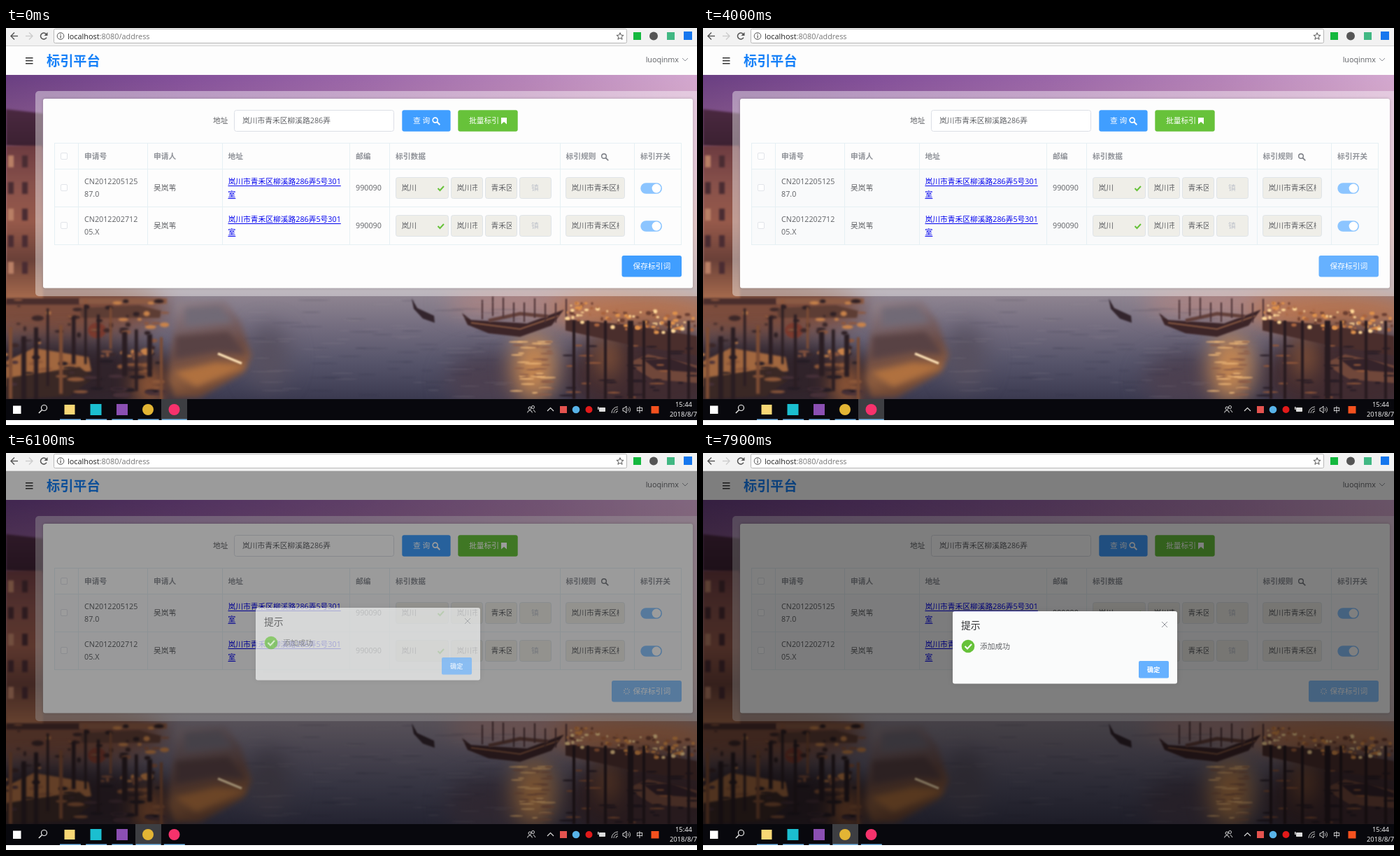
An HTML page with a canvas for the animation above (8 s loop, 988 by 567 pixels).

```html
<!DOCTYPE html>
<html lang="zh">
<head>
<meta charset="utf-8">
<style>
html, body { margin: 0; width: 100%; height: 100%; overflow: hidden; background: #fff; }
canvas { display: block; }
</style>
</head>
<body>
<canvas id="stage" width="988" height="567"></canvas>
<script>
const stage = document.getElementById('stage');
const FONT = '"Open Sans", "Noto Sans CJK SC", "Noto Sans CJK", sans-serif';
const INK = '#606266', MUTED = '#909399', BLUE = '#409eff', LIGHT_BLUE = '#66b1ff', PALE_BLUE = '#8cc5ff';
const GREEN = '#67c23a', BORDER = '#e6f0f4';
const CITY = '岚川', DISTRICT = '青禾区', STREET = CITY + '市' + DISTRICT + '柳溪路286弄';
let c = stage.getContext('2d');

function rect(x, y, w, h, fill, r = 0, stroke) {
  c.beginPath();
  c.roundRect(x, y, w, h, r);
  if (fill) { c.fillStyle = fill; c.fill(); }
  if (stroke) { c.strokeStyle = stroke; c.lineWidth = 1; c.stroke(); }
}
function path(points, color, width) {
  c.beginPath();
  for (let i = 0; i < points.length; i += 2) c.lineTo(points[i], points[i + 1]);
  if (width) { c.strokeStyle = color; c.lineWidth = width; c.stroke(); }
  else { c.fillStyle = color; c.fill(); }
}
function arc(x, y, r, color, width, from = 0, to = 7) {
  c.beginPath();
  c.arc(x, y, r, from, to);
  if (width) { c.strokeStyle = color; c.lineWidth = width; c.stroke(); }
  else { c.fillStyle = color; c.fill(); }
}
// y is the optical middle of the line
function text(s, x, y, color = INK, size = 10.75, weight = '', align = 'left') {
  c.font = `${weight} ${size}px ${FONT}`;
  c.textAlign = align;
  c.fillStyle = color;
  c.fillText(s, x, y + size * 0.37);
}
function lens(x, y, r, color, width, side = 1) {
  arc(x, y, r, color, width);
  path([x + side * r * .7, y + r * .7, x + side * r * 1.9, y + r * 1.9], color, width * 1.2);
}
function gradient(x0, y0, x1, y1, ...colors) {
  const g = c.createLinearGradient(x0, y0, x1, y1);
  colors.forEach((col, i) => g.addColorStop(i / (colors.length - 1), col));
  return g;
}
function glow(x, y, rx, ry, color) {
  c.beginPath();
  c.ellipse(x, y, rx, ry, 0, 0, 7);
  c.fillStyle = color;
  c.fill();
}

// Soft harbour at dusk, painted once
function paintPhoto() {
  const screen = c, layer = document.createElement('canvas');
  layer.width = 988; layer.height = 567;
  c = layer.getContext('2d');
  let seed = 7;
  const random = () => (seed = seed * 16807 % 2147483647) / 2147483647;

  // Sky and water
  rect(0, 60, 988, 330, gradient(0, 0, 988, 0, '#6a3f82', '#83509a', '#9a66a8', '#b583b8', '#d3a8cf'));
  rect(0, 60, 988, 330, gradient(0, 70, 0, 390, '#d09a9000', '#c898a060', '#c99a90d0', '#94848e'));
  rect(0, 371, 988, 170, gradient(0, 371, 0, 530, '#958a95', '#756e80', '#56546a', '#3b3a50'));
  c.filter = 'blur(16px)';
  glow(60, 400, 170, 45, '#7b4c3c');
  glow(70, 500, 190, 55, '#30232a');
  glow(760, 392, 130, 20, '#b08480');
  glow(900, 405, 120, 28, '#b8744f');
  glow(915, 495, 115, 65, '#402b30');
  glow(690, 505, 60, 40, '#4c4050');
  glow(755, 485, 30, 48, '#c88850');
  glow(860, 470, 12, 30, '#a0643c');
  glow(205, 510, 18, 30, '#b0683a');
  glow(375, 470, 30, 45, '#57505f');
  c.filter = 'blur(1.5px)';

  // Houses on the left edge
  path([0, 116, 53, 122, 53, 172, 0, 168], gradient(0, 116, 0, 172, '#4a2840', '#3a2030'));
  rect(0, 168, 53, 222, gradient(0, 168, 0, 385, '#6c3b40', '#87504a', '#96594a', '#6a4038', '#a4694c'));
  for (let i = 0; i < 10; i++) rect(3 + i % 2 * 20, 182 + (i >> 1) * 38, 8, 17, i % 4 ? '#4a2c32' : '#b98066');

  // Jetty with posts
  rect(0, 386, 105, 9, '#4a2e2c');
  rect(105, 386, 125, 8, '#8b5a44');
  path([105, 400, 190, 396, 222, 404, 220, 414, 108, 414], '#5d3d34');
  path([0, 476, 40, 457, 118, 470, 122, 490, 0, 512], '#a1673f');
  path([0, 500, 105, 484, 125, 500, 90, 526, 0, 530], '#3a2825');
  glow(130, 432, 13, 11, '#7a3a2e');
  for (let i = 0; i < 60; i++) glow(random() * 228, 388 + random() * 85, 2 + random() * 7, 1 + random() * 3, ['#c9834a', '#3b2728', '#8d573e', '#2e2024'][i % 4]);
  for (let i = 0; i < 40; i++) glow(random() * 228, 475 + random() * 55, 4 + random() * 9, 1 + random() * 2, ['#8c5739', '#241c24', '#463038'][i % 3]);
  for (let i = 0; i < 13; i++) rect(4 + i * 18, 392 + random() * 50, 3 + random() * 5, 60 + random() * 70, i % 4 ? '#2a1d22' : '#7c4c34');

  // Moving water taxi
  c.filter = 'blur(4px)';
  path([244, 390, 314, 390, 336, 420, 351, 468, 340, 492, 276, 528, 240, 528, 231, 500, 238, 440],
    gradient(270, 388, 300, 530, '#8f8088', '#78646a', '#6b4c46', '#8e5d3e', '#5c3b30'));
  path([256, 400, 306, 397, 324, 420, 256, 426], '#716a76');
  path([242, 440, 318, 434, 344, 466, 300, 462, 242, 472], '#584244');
  path([240, 492, 300, 478, 345, 482, 272, 512], '#b0713f');
  c.filter = 'blur(1.2px)';
  path([303, 465, 337, 479], '#ffe4b8', 3.5);

  // Gondolas
  path([580, 386, 588, 400, 612, 411, 613, 421, 596, 415, 583, 401], '#33252d');
  path([652, 407, 665, 417, 745, 422, 798, 402, 780, 425, 735, 441, 690, 436, 660, 424], '#3c2528');
  path([665, 421, 735, 430, 790, 411], '#a26a4a', 1.5);
  path([690, 418, 735, 408, 775, 412], '#63403a', 5);
  for (let i = 0; i < 9; i++) rect(680 + i * 15, 383 + random() * 12, 2, 28, '#4a3034');

  // Lit quay, posts and reflections
  path([800, 416, 890, 424, 988, 440, 988, 468, 890, 452, 800, 432], '#4a2e2c');
  path([890, 478, 918, 466, 988, 482, 988, 507, 925, 502, 905, 490], '#70473a');
  path([912, 474, 950, 472, 988, 486, 988, 492, 930, 488], '#35232a');
  for (let i = 0; i < 110; i++) {
    const x = 800 + random() * 188;
    glow(x, 388 + (x - 800) * .12 + random() * 32, 1 + random() * 3, 1 + random() * 2, ['#6b3f32', '#de914c', '#ffd898', '#a9643f'][i % 4]);
  }
  for (let i = 0; i < 40; i++) glow(753 + (random() - .5) * 50, 445 + random() * 82, 4 + random() * 9, 1, i % 2 ? '#eeb878' : '#8c5c48');
  for (let i = 0; i < 35; i++) glow(800 + random() * 185, 450 + random() * 78, 4 + random() * 9, 1.2, i % 3 ? '#281d26' : '#93583a');
  for (const x of [810, 830, 855, 889, 910, 946, 974]) rect(x, 418, x === 889 ? 8 : 4, 112, '#281b20');
  for (let i = 0; i < 90; i++) glow(355 + random() * 370, 388 + random() * 140, 8 + random() * 16, .8, i % 2 ? '#a094a030' : '#2a2b4030');
  c = screen;
  return layer;
}
const photo = paintPhoto();

function drawToolbar() {
  rect(0, 0, 988, 26, '#f2f2f2');
  rect(0, 25, 988, 1, '#d4d4d4');
  rect(68.5, 1.5, 819, 20, '#fff', 2, '#b8b8b8');
  for (const [x, d, color] of [[12, -1, '#555'], [33, 1, '#ccc']]) {
    path([x - 5, 11.5, x + 5, 11.5], color, 1.4);
    path([x, 6.5, x + 5 * d, 11.5, x, 16.5], color, 1.4);
  }
  arc(54, 11.5, 4.5, '#555', 1.5, .5, 5.6);
  path([59.5, 6, 59.5, 11, 54.5, 11], '#555');
  arc(78, 11.5, 4.8, '#555', 1);
  rect(77.5, 10.5, 1.2, 4, '#555');
  rect(77.5, 8.3, 1.2, 1.2, '#555');
  text('localhost', 88, 11.5, '#222', 10.9);
  text(':8080/address', 88 + c.measureText('localhost').width, 11.5, '#777', 10.9);
  const star = [];
  for (let i = 0; i <= 10; i++) {
    const r = i % 2 ? 2.3 : 5.3, a = i * Math.PI / 5;
    star.push(878 + r * Math.sin(a), 12 - r * Math.cos(a));
  }
  path(star, '#555', 1);
  rect(897, 6, 11, 11, '#14b83e');
  arc(926, 11.5, 6, '#555');
  rect(945, 6, 11, 11, '#41b883');
  rect(969, 5, 12, 12, '#1677ee');
}

function field(x, y, w, s, color = INK) {
  rect(x + .5, y + .5, w - 1, 30, '#efeee8', 3, '#dfe4e8');
  c.save();
  c.beginPath();
  c.rect(x + 8, y, w - 16, 31);
  c.clip();
  text(s, x + 8.5, y + 15.5, color);
  c.restore();
}

function drawRow(y, id, tail, tint) {
  c.globalAlpha = tint;
  rect(69, y, 897, 54, '#f5f7fa');
  c.globalAlpha = 1;
  rect(78.5, y + 22.5, 9, 9, '#fff', 1.5, '#e2e5ea');
  text(id, 112, y + 18.5);
  text(tail, 112, y + 36.5);
  text('吴岚苇', 211, y + 27.5);
  [[STREET + '5号301', y + 18.5], ['室', y + 36.5]].forEach(([s, ly]) => {
    text(s, 317.5, ly, '#0000ee');
    rect(317.5, ly + 5.5, c.measureText(s).width, 1, '#0000ee');
  });
  text('990090', 500, y + 27.5);
  field(557, y + 12, 76, CITY);
  path([617.5, y + 28, 620.5, y + 31, 626, y + 25], GREEN, 2);
  field(636, y + 12, 46, CITY + '市');
  field(685, y + 12, 46, DISTRICT);
  field(734, y + 12, 46, '');
  text('镇', 751, y + 27.5, '#c0c4cc');
  field(800, y + 12, 85, STREET);
  rect(907.3, y + 20.3, 30.7, 15.4, PALE_BLUE, 8);
  arc(930, y + 28, 6.4, '#fff');
}

function drawSpinner(x, y, angle) {
  for (let i = 0; i < 8; i++) {
    const a = angle + i * Math.PI / 4, u = Math.cos(a), v = Math.sin(a);
    path([x + 2.6 * u, y + 2.6 * v, x + 4.8 * u, y + 4.8 * v], '#fff', 1);
  }
}

function drawPage(t) {
  rect(0, 26, 988, 41, '#fdfdfd');
  for (const y of [42, 46, 50]) rect(28, y, 10.5, 1.5, '#333');
  text('标引平台', 58, 46.5, '#1680f8', 19.2, 'bold');
  text('luoqinmx', 962, 45, INK, 10.75, '', 'right');
  path([967, 43, 971, 47, 975, 43], MUTED, 1);
  c.drawImage(photo, 0, 67, 988, 463, 0, 67, 988, 463);
  rect(42, 90, 960, 293, 'rgba(255,255,255,.4)', 5);
  c.shadowColor = 'rgba(0,0,0,.2)';
  c.shadowBlur = 4;
  rect(53, 101, 929, 270.5, '#fdfdfd', 3);
  c.shadowColor = 'transparent';

  text('地址', 296, 132.5);
  rect(326.5, 117.5, 228, 30, '#fff', 3, '#dcdfe6');
  text(STREET, 338, 132.5);
  rect(566.3, 117.3, 69.3, 30.4, BLUE, 3);
  text('查 询', 582, 132.5, '#fff');
  lens(613.7, 131.6, 3.5, '#fff', 1.6);
  rect(646.3, 117.3, 85.4, 30.4, GREEN, 3);
  text('批量标引', 662, 132.5, '#fff');
  path([708, 128, 716, 128, 716, 137.5, 712, 134, 708, 137.5], '#fff');

  const rowOne = t < 600 ? 0 : t < 3600 ? Math.min(1, (t - 500) / 400) : .5;
  const rowTwo = t < 3600 ? 0 : t < 4000 ? 1 : .5;
  drawRow(201, 'CN2012205125', '87.0', rowOne);
  drawRow(255, 'CN2012202712', '05.X', rowTwo);
  rect(78.5, 178.5, 9, 9, '#fff', 1.5, '#e2e5ea');
  [['申请号', 112], ['申请人', 211], ['地址', 317.5], ['邮编', 500], ['标引数据', 557], ['标引规则', 800.5], ['标引开关', 907]]
    .forEach(([s, x]) => text(s, x, 183.5, MUTED, 10.75, 'bold'));
  lens(855, 183, 3.3, '#777a80', 1.4);
  for (const x of [69, 103, 202, 309, 491, 548, 792, 898, 965]) rect(x, 165, 1, 145, BORDER);
  for (const y of [164, 201, 255, 309]) rect(69, y, 897, 1, BORDER);

  const loading = t >= 6000;
  const left = loading ? 866 : 880.5;
  const color = loading ? PALE_BLUE : t >= 5900 ? '#3a8ee6' : t >= 4000 ? LIGHT_BLUE : BLUE;
  rect(left, 325, 966 - left, 30.5, color, 3);
  if (loading) drawSpinner(887.5, 340.3, (t - 6000) / 2000 * 2 * Math.PI);
  text('保存标引词', 896.5, 340.3, '#fff');
}

function drawPopover(t) {
  const alpha = t < 2200 ? Math.min(1, (t - 500) / 400) : (2400 - t) / 300;
  if (t < 600 || alpha <= 0) return;
  c.globalAlpha = alpha;
  c.shadowColor = 'rgba(0,0,0,.1)';
  c.shadowBlur = 8;
  rect(801.5, 140.5, 183, 58, '#fff', 3, '#ebeef5');
  c.shadowColor = 'transparent';
  path([811, 198, 816, 204, 821, 198], '#fff');
  text('标引规则', 811, 156, '#303133', 12);
  text(STREET, 811, 182);
  c.globalAlpha = 1;
}

function drawDialog(t) {
  if (t < 6100) return;
  const shown = t < 6200 ? .67 : t < 6300 ? .96 : 1;
  rect(0, 26, 988, 504, `rgba(0,0,0,${t < 6200 ? .39 : .5})`);
  c.save();
  c.translate(0, Math.round(-15 * (1 - shown)));
  c.globalAlpha = shown;
  c.shadowColor = 'rgba(0,0,0,.1)';
  c.shadowBlur = 8;
  rect(357, 226, 321, 103.5, '#fafbfb', 3);
  c.shadowColor = 'transparent';
  text('提示', 369, 245.5, '#303133', 13.8);
  path([656, 241, 664, 249], MUTED, 1);
  path([664, 241, 656, 249], MUTED, 1);
  arc(379, 276, 9.3, GREEN);
  path([374.5, 276, 378, 279.5, 384, 273], '#fff', 2);
  text('添加成功', 396, 276.5);
  rect(623, 297, 43, 24.5, LIGHT_BLUE, 2);
  text('确定', 635, 309.5, '#fff', 9.2, 'bold');
  c.restore();
}

function drawTaskbar(t) {
  rect(0, 530, 988, 30, '#08080d');
  rect(0, 560, 988, 7, '#fff');
  const active = t < 5900 ? 4 : 3;
  rect(74 + 37 * active, 530, 37, 30, '#3d3e42');
  for (let i = 0; i < 5; i++) {
    const grow = i === active ? 3 : 0;
    rect(77 + 37.2 * i - grow, 558.5, 30 + 2 * grow, 1.5, '#76b9ed');
  }
  rect(10, 539.5, 11.5, 11.5, '#fff');
  lens(54.5, 542.5, 4, '#eee', 1.2, -1);
  rect(83.5, 538, 15, 14, '#f8d775');
  rect(120.5, 537, 16, 16, '#1bbfd0');
  rect(158, 537, 16, 16, '#8b4fb2');
  arc(203, 545, 8, '#e3b534');
  arc(240.5, 545, 8, '#f7326c');

  arc(749, 543, 2, '#ddd', 1);
  arc(753.5, 541.5, 2, '#ddd', 1);
  arc(749, 549.5, 3.3, '#ddd', 1, Math.PI, 2 * Math.PI);
  path([754, 545, 757, 549], '#ddd', 1);
  path([774, 547, 778.5, 542.5, 783, 547], '#ddd', 1.2);
  rect(792, 540, 10, 10, '#e4534f');
  arc(815, 545, 5.3, '#58b3e8');
  arc(833.5, 545, 5, '#e21a1a');
  rect(848.5, 542.5, 8, 5, '#ddd', 0, '#ddd');
  rect(846, 541, 1.5, 4, '#ddd');
  for (const r of [3, 6, 9]) arc(875, 550, r, '#ccc', 1, Math.PI, Math.PI * 1.5);
  path([882, 543, 884, 543, 887, 540, 887, 550, 884, 547, 882, 547, 882, 543], '#ddd', 1);
  for (const r of [3, 5.5]) arc(887, 545, r, '#bbb', 1, -.8, .8);
  text('中', 901, 545, '#fff', 10);
  rect(922.5, 540, 11, 10.5, '#f4511e');
  text('15:44', 957, 538, '#fff', 9.4);
  text('2018/8/7', 949, 552, '#fff', 9.4);
}

function draw() {
  const t = Math.floor(performance.now() % 8000 / 100) * 100;
  drawPage(t);
  drawPopover(t);
  drawDialog(t);
  drawToolbar();
  drawTaskbar(t);
  requestAnimationFrame(draw);
}
draw();
</script>
</body>
</html>
```
